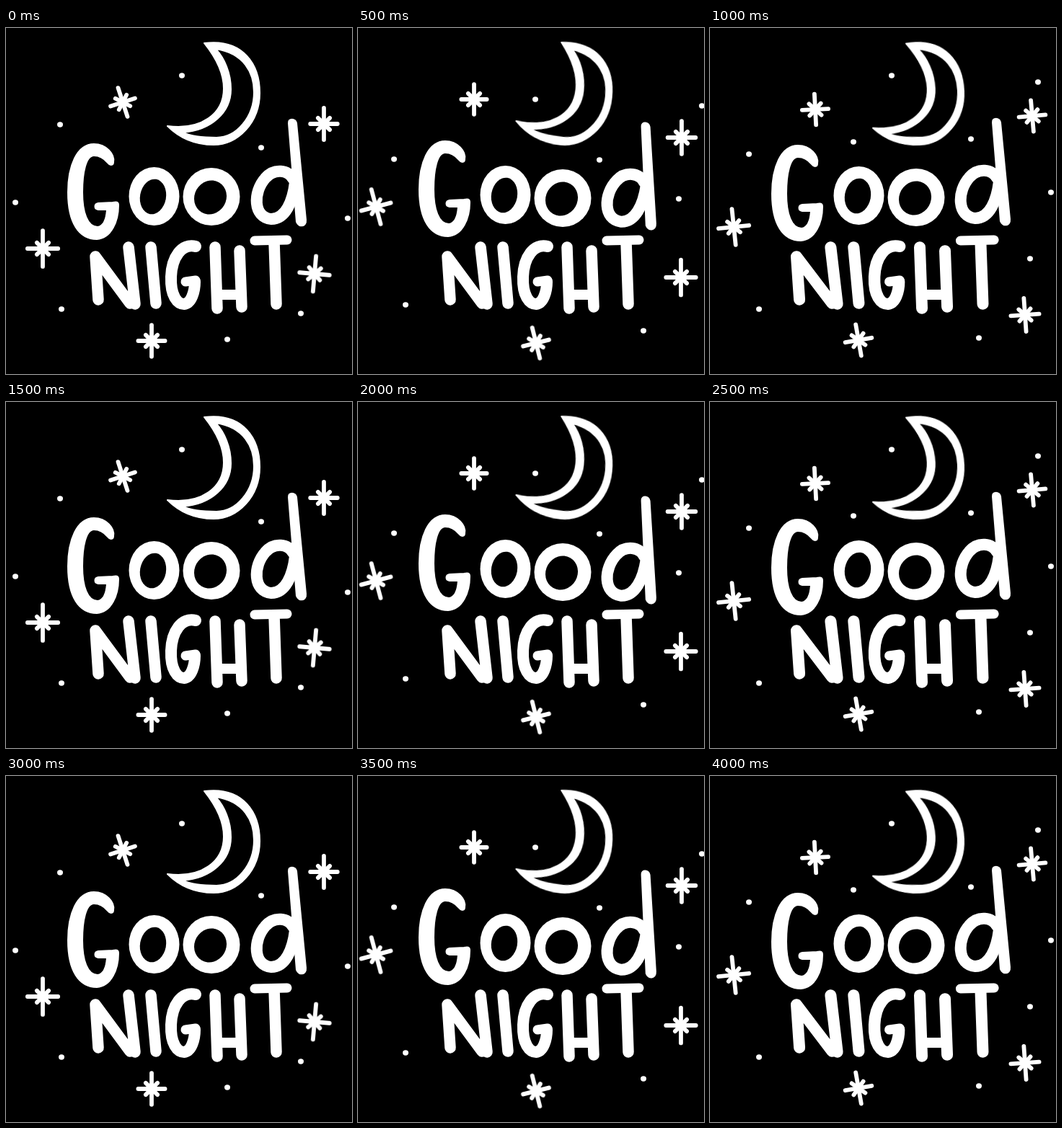
An HTML page that plays this animation: 480 by 480 pixels, repeating every 4500 ms.

```html
<!DOCTYPE html>
<html lang="en">
<head>
<meta charset="utf-8">
<title>Good night</title>
<style>
  html, body { margin: 0; width: 100%; height: 100%; overflow: hidden; background: #000; }
  svg { display: block; width: 100%; height: 100%; }
  .pose { fill: none; stroke: #fff; stroke-linecap: round; stroke-linejoin: round; }
</style>
</head>
<body>
<svg id="stage" viewBox="0 0 480 480" role="img" aria-label="Good night"></svg>
<script>
const HOLD = 500;
const stage = document.getElementById('stage');

const group = (transform, ...parts) => `<g transform="${transform}">${parts.join('')}</g>`;
const line = (d, width) => `<path d="${d}" stroke-width="${width}"/>`;
const solid = d => `<path d="${d}" fill="#fff" fill-rule="evenodd" stroke-width="2"/>`;
const blob = (x, y, rx, ry, fill = '#fff', tilt = 0) =>
  `<ellipse cx="${x}" cy="${y}" rx="${rx}" ry="${ry}" fill="${fill}" stroke="none" transform="rotate(${tilt} ${x} ${y})"/>`;

// Outer crescent with a smaller crescent cut out of it.
const moon = solid(
  'M275 21C330 14 352 52 352 90C352 131 322 162 288 162C258 162 239 151 224 136C271 142 302 119 302 84C302 62 291 41 275 21Z' +
  'M291 29C330 35 344 62 344 89C344 123 320 152 292 152C272 152 256 150 245 145C285 142 312 117 312 85C312 62 303 42 291 29Z');

const bigG = solid('M149 186C151 176 140 161 122 161C98 161 86 192 86 228C86 270 101 293 126 293' +
  'C146 292 156 268 156 246C156 241 153 241 148 242L128 243C122 244 122 251 128 252L140 252' +
  'C139 267 134 275 127 276C113 276 106 256 106 228C106 200 111 177 122 177' +
  'C131 177 137 182 141 187C144 191 149 191 149 186Z');

const firstO = blob(205.5, 233.5, 35, 40.5) + blob(204, 234, 18, 24.5, '#000', 10);
const secondO = blob(285, 234, 39.5, 40) + blob(283.5, 235, 22, 24, '#000', 30);

const d = line('M398 209C392 197 372 194 360 208C342 228 343 263 368 265C388 265 398 240 401 214', 16) +
  solid('M392 132C391 125 402 125 403 132L416 266C417 276 406 277 403 269Z');

const night = [
  line('M128 377L124 317L172 382M170 304L179 383', 15.5),
  line('M201 304L208 382', 15.5),
  line('M263 303C244 298 230 318 229 345C228 372 238 383 247 383C257 382 262 366 262 352', 16),
  line('M249 352L263 350', 13),
  line('M290 304L293 389M324 309L327 387', 15.5), line('M294 370H326', 14),
  line('M372 297L375 383', 15.5), line('M345 295L390 294', 13)
].join('');

// Rays are longest around the middle height of the sky.
function star([x, y, tilt]) {
  const reach = 16 + 9 * Math.sin(Math.PI * y / 560);
  const rays = [0, 45, 90, 135].map((turn, i) => {
    const half = i % 2 ? 11.5 : reach * (i ? 1 : 0.85);
    return group(`rotate(${turn})`, line(`M${-half} 0H${half}`, 5.8));
  });
  return group(`translate(${x} ${y}) rotate(${tilt})`, ...rays);
}

const dot = ([x, y]) => blob(x, y, 4, 3.7);

// Each pose nudges the same drawing; stars are x, y, tilt and dots x, y.
const poses = [
  {
    moon: 0, g: [0, 0], o: [0, 0], d: [0, 0, 0], spread: 1,
    stars: [[162, 103, -18], [441, 133, 0], [51, 306, 0], [428, 341, 5], [202, 434, 0]],
    dots: [[75, 134], [244, 66], [13, 242], [354, 166], [474, 264], [77, 390], [409, 396], [307, 432]]
  },
  {
    moon: 6, g: [-1, -4], o: [-1, 2], d: [-2, 4, 2], spread: 1,
    stars: [[161, 99, 0], [449, 152, 0], [25, 248, -15], [448, 346, 0], [247, 437, -14]],
    dots: [[246, 99], [477, 108], [50, 182], [335, 183], [445, 237], [66, 384], [396, 420]]
  },
  {
    moon: -2.5, g: [0, 2], o: [1, 1], d: [0, -1, 0], spread: 1.03,
    stars: [[146, 113, -3], [447, 122, -5], [33, 276, -6], [437, 398, -4], [206, 433, -10]],
    dots: [[252, 66], [455, 75], [199, 158], [362, 154], [54, 175], [473, 228], [444, 320], [68, 390], [373, 430]]
  }
];

function draw(p) {
  const [dx, dy, tilt] = p.d;
  return [
    group(`rotate(${p.moon} 288 90)`, moon),
    group(`translate(${p.g})`, bigG),
    group(`translate(${p.o[0]} ${-p.o[1]})`, firstO),
    group(`translate(${p.o})`, secondO),
    group(`translate(${dx} ${dy}) rotate(${tilt} 375 235)`, d),
    group(`translate(258 0) scale(${p.spread} 1) translate(-258 0)`, night),
    ...p.stars.map(star), ...p.dots.map(dot)
  ].join('');
}

stage.innerHTML = poses.map(p => `<g class="pose">${draw(p)}</g>`).join('');

const cycle = HOLD * poses.length;
const steps = [
  { opacity: 1, offset: 0, easing: 'step-end' },
  { opacity: 0, offset: 1 / poses.length, easing: 'step-end' },
  { opacity: 0, offset: 1 }
];
stage.querySelectorAll('.pose').forEach((pose, k) =>
  pose.animate(steps, { duration: cycle, delay: k * HOLD - cycle, iterations: Infinity }));
</script>
</body>
</html>
```
